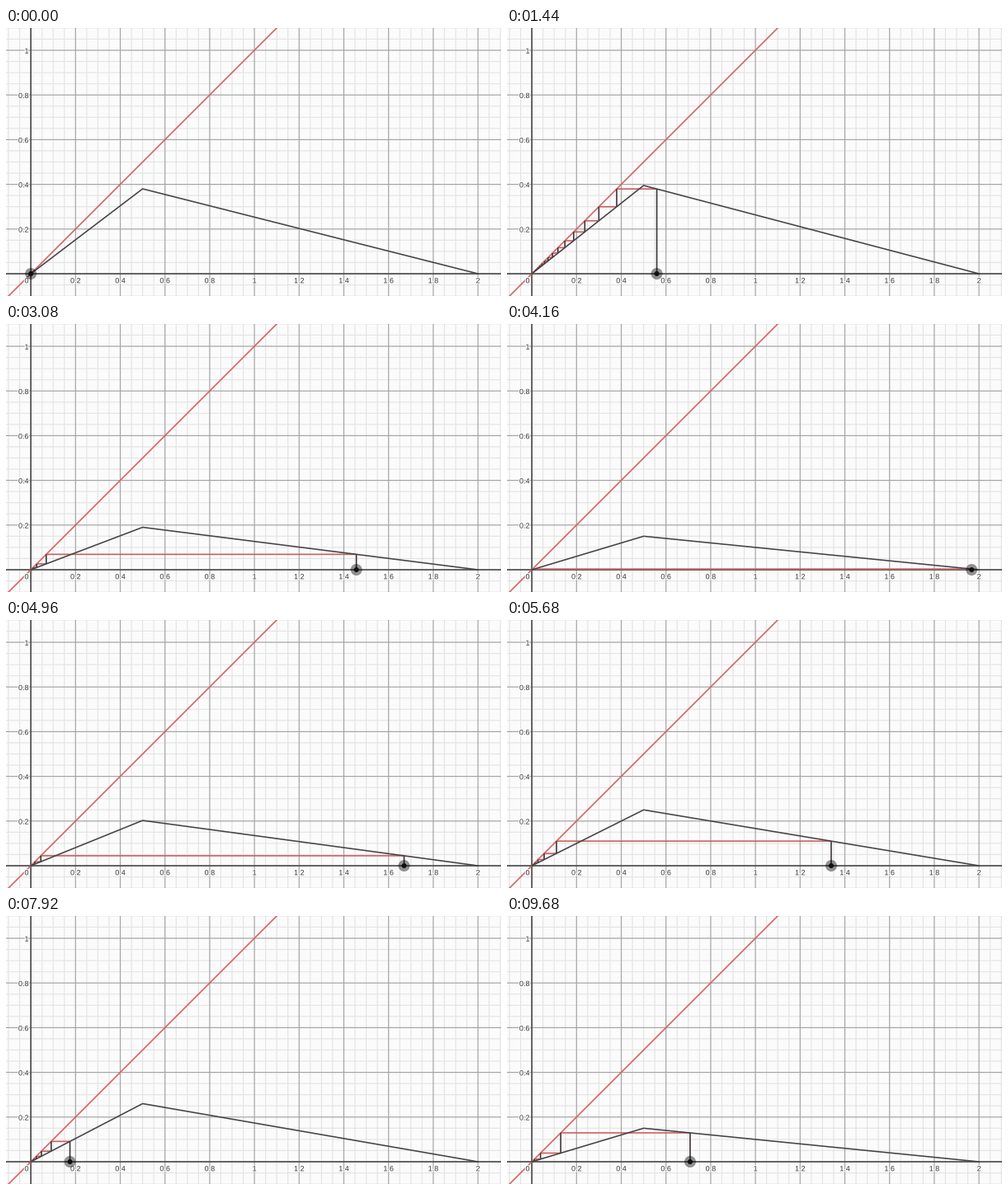
Animation of 600 by 325 pixels, one loop 9.72 s. Source, as a matplotlib script:

```python
import numpy as np
import matplotlib.pyplot as plt
import matplotlib.patheffects as pe
from matplotlib.animation import FuncAnimation
from matplotlib.collections import LineCollection
from matplotlib.patches import Circle

W, H, DPI = 600, 325, 100
LOOP, STEP = 9720, 40
X0, Y0, UNIT = 30.1, 298.0, 271.0
PX = 72 / DPI

PAPER, INK, RED = "#fcfbfc", "#454347", "#cf6a66"

# Times in seconds: start value x of the orbit, and slope a of the left branch.
X_KEYS = [(0, 0), (0.22, 0), (1.44, 0.559), (3.08, 1.456), (4.16, 1.967),
          (4.24, 2), (5.68, 1.339), (7.92, 0.175), (8.24, 0), (9.68, 0.708)]
A_KEYS = [(0, 0.76), (0.85, 0.9), (1.44, 0.79), (3.08, 0.38), (3.7, 0.27),
          (4.16, 0.30), (5.68, 0.50), (6.8, 0.65), (7.92, 0.52), (9.68, 0.30)]
HOLDS = [(1.76, 1.92), (8.16, 8.32), (9.28, 9.44)]


def px(x):
    return X0 + UNIT * np.asarray(x, float)


def py(y):
    return Y0 - UNIT * np.asarray(y, float)


def track(keys, t):
    times, values = zip(*keys)
    return float(np.interp(t, times, values))


def tent(x, a):
    return a * x if x < 0.5 else a * (2 - x) / 3


def cobweb(x, a, steps=24):
    """Vertical and horizontal segments of the orbit starting at x."""
    rises, runs = [], []
    y = 0.0
    for _ in range(steps):
        fx = tent(x, a)
        rises.append([(px(x), py(y)), (px(x), py(fx))])
        runs.append([(px(x), py(fx)), (px(fx), py(fx))])
        x = y = fx
    return rises, runs


fig = plt.figure(figsize=(W / DPI, H / DPI), dpi=DPI, facecolor=PAPER)
ax = fig.add_axes([0, 0, 1, 1])
ax.set_xlim(0, W)
ax.set_ylim(H, 0)
ax.axis("off")


def segments(color, width, z, lines=()):
    art = LineCollection(lines, colors=color, linewidths=width * PX, zorder=z)
    art.set_snap(False)
    return ax.add_collection(art)


def grid(step, skip, color, width, z):
    lines = []
    for k in range(-2, 43):
        if k % step or (skip and k % skip == 0):
            continue
        v = k * 0.05
        lines.append([(px(v), 0), (px(v), H)])
        if v < 1.2:
            lines.append([(0, py(v)), (W, py(v))])
    segments(color, width, z, lines)


grid(1, 4, "#e4e3e3", 1.1, 1)
grid(4, 0, "#a5a4a4", 1.2, 2)
segments("#444444", 1.5, 3, [[(px(0), 0), (px(0), H)], [(0, py(0)), (W, py(0))]])

halo_fx = [pe.withStroke(linewidth=1.6, foreground=PAPER)]


def label(x, y, text, ha):
    ax.text(x, y, text, ha=ha, va="center_baseline", fontsize=9 * PX,
            family="Liberation Sans", color="#3a3a3a", zorder=8,
            path_effects=halo_fx)


label(25, 305.8, "0", "center")
for k in range(1, 11):
    name = f"{k * 0.2:.1f}".replace(".0", "")
    label(px(k * 0.2), 305.8, name, "center")
    if k <= 5:
        label(27.5, py(k * 0.2) + 0.3, name, "right")

ax.plot(px([-0.2, 1.2]), py([-0.2, 1.2]), color=RED, lw=1.7 * PX, zorder=4)
runs_art = segments("#cb5c5a", 1.6, 5)
rises_art = segments("#3a3236", 1.6, 6)
curve, = ax.plot([], [], color=INK, lw=1.6 * PX, zorder=7,
                 solid_joinstyle="round")
halo = Circle((0, 0), 7, fc="#000000", ec="none", alpha=0.42, zorder=9)
dot = Circle((0, 0), 3, fc="#111111", ec="none", zorder=10)
ax.add_patch(halo)
ax.add_patch(dot)


def draw(i):
    t = i * STEP / 1000
    for start, end in HOLDS:
        if start < t < end - 0.001:
            t = start
    x, a = track(X_KEYS, t), track(A_KEYS, t)
    rises, runs = cobweb(x, a)
    rises_art.set_segments(rises)
    runs_art.set_segments(runs)
    curve.set_data(px([0, 0.5, 2]), py([0, a / 2, 0]))
    for c in (halo, dot):
        c.center = (px(x), py(0))
    return runs_art, rises_art, curve, halo, dot


anim = FuncAnimation(fig, draw, frames=LOOP // STEP, interval=STEP,
                     repeat=True, repeat_delay=0, blit=False)
plt.show()
```
